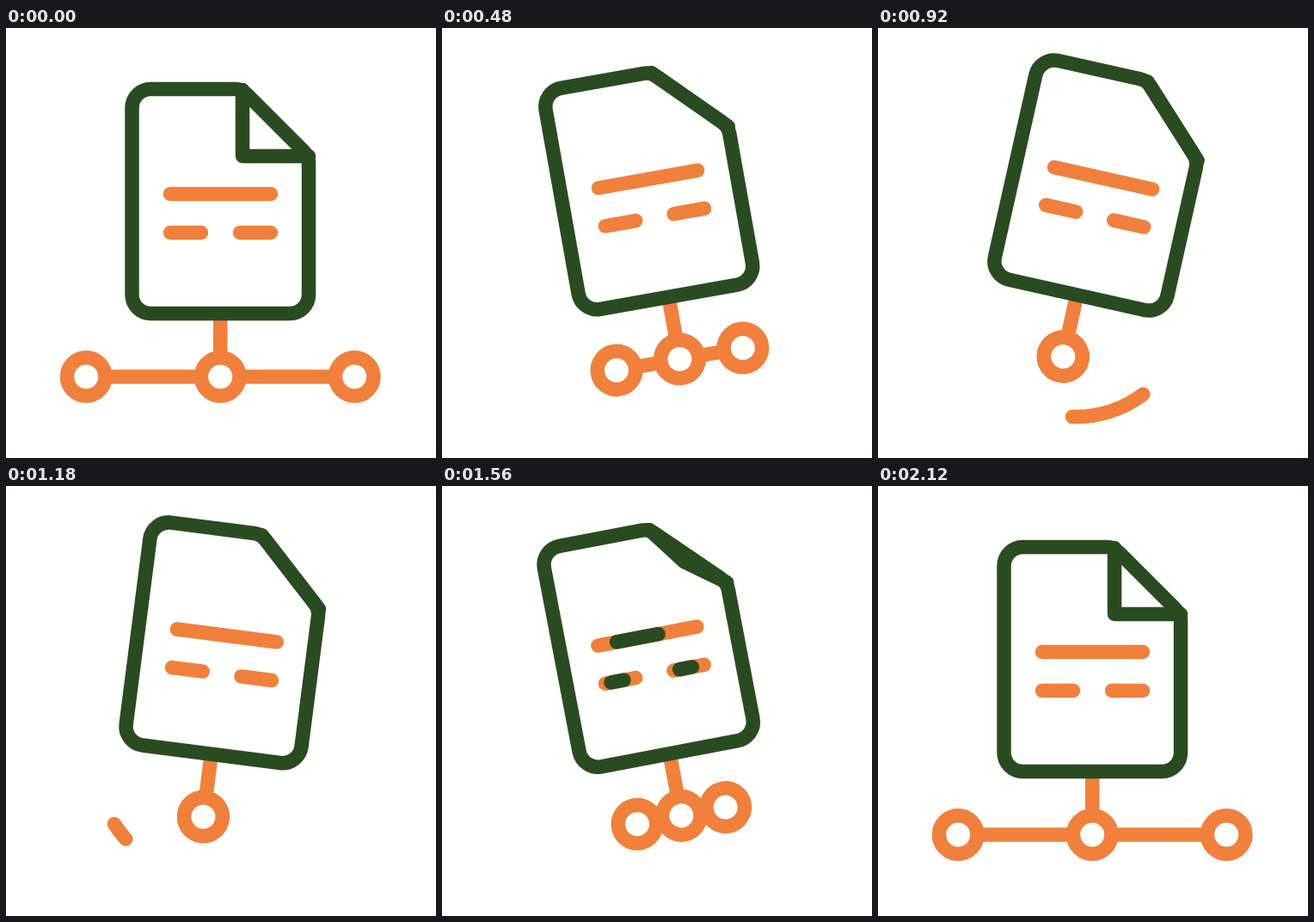
These frames come from a looping animation (500 px wide and 500 px high, 2.32 s). An HTML page with a canvas:

```html
<!DOCTYPE html>
<html lang="en">
<head>
<meta charset="utf-8">
<title>Document network</title>
<style>
  html, body { margin: 0; width: 100%; height: 100%; overflow: hidden; background: #fff; }
  canvas { display: block; width: 500px; height: 500px; }
</style>
</head>
<body>
<canvas id="stage" width="500" height="500"></canvas>
<script>
const ctx = document.getElementById('stage').getContext('2d');
const GREEN = '#2a4b21', ORANGE = '#f0803c';
const LOOP = 2320, STEP = 20;

const clamp = u => Math.max(0, Math.min(1, u));
const smooth = (t, a, b) => (1 - Math.cos(Math.PI * clamp((t - a) / (b - a)))) / 2;
const easeOut = (t, a, b) => 1 - (1 - clamp((t - a) / (b - a))) ** 3;

// Eased value through [time, value] keys.
function track(t, keys) {
  let value = keys[0][1];
  for (let i = 1; i < keys.length; i++) {
    value += (keys[i][1] - keys[i - 1][1]) * smooth(t, keys[i - 1][0], keys[i][0]);
  }
  return value;
}

const tilt = [[80, 0], [310, -14.3], [970, 13], [1012, 13], [1530, -10.9], [2050, 0]];
const lift = [[80, 0], [560, -19.5], [1662, -19.5], [1920, 14], [2120, 0]];
const textLines = [[191, 308, 193], [191, 227, 238], [272, 308, 238]];
const sheet = new Path2D(
  'M168.5 71 H266 Q274 71 280 77 L345 142 Q352 149 352 157 V310 ' +
  'A22 22 0 0 1 330 332 H168.5 A22 22 0 0 1 146.5 310 V93 A22 22 0 0 1 168.5 71 Z');

function line(color, ...points) {
  ctx.strokeStyle = color;
  ctx.beginPath();
  points.forEach(([x, y]) => ctx.lineTo(x, y));
  ctx.stroke();
}

function ring(x) {
  ctx.strokeStyle = ORANGE;
  ctx.beginPath();
  ctx.arc(x, 405.5, 22.25, 0, 2 * Math.PI);
  ctx.fill();
  ctx.stroke();
}

function drawNetwork(t) {
  const gap = 156 * (1 - smooth(t, 222, 724) + easeOut(t, 1492, 2027));
  line(ORANGE, [249.2, 332], [249.2, 405]);
  line(ORANGE, [249.2 - gap, 405.5], [249.2 + gap, 405.5]);
  [-gap, gap, 0].forEach(dx => ring(249.2 + dx));
}

function drawSheet(t) {
  const fold = 38.5 * (smooth(t, 100, 440) - smooth(t, 1500, 1740));
  ctx.strokeStyle = GREEN;
  ctx.fill(sheet);
  ctx.stroke(sheet);
  line(GREEN, [275, 72], [275 + fold, 149 - fold], [352, 149]);
}

function drawText(t) {
  const head = smooth(t, 1400, 1680), tail = smooth(t, 1480, 1760);
  for (const [a, b, y] of textLines) {
    line(ORANGE, [a, y], [b, y]);
    if (head > tail) line(GREEN, [a + (b - a) * tail, y], [a + (b - a) * head, y]);
  }
}

// Stroke sweeping from right to left below the network.
function drawSweep(t) {
  const angle = u => (40 + 99.7 * u) * Math.PI / 180;
  const head = smooth(t, 800, 1080), tail = smooth(t, 900, 1250);
  if (head <= tail) return;
  ctx.strokeStyle = ORANGE;
  ctx.beginPath();
  ctx.arc(249, 341, 133, angle(tail), angle(head));
  ctx.stroke();
}

function draw(t) {
  ctx.setTransform(1, 0, 0, 1, 0, 0);
  ctx.fillStyle = '#fff';
  ctx.fillRect(0, 0, 500, 500);
  ctx.translate(250, 250 + track(t, lift));
  ctx.rotate(track(t, tilt) * Math.PI / 180);
  ctx.translate(-250, -250);
  ctx.lineWidth = 16.5;
  ctx.lineCap = ctx.lineJoin = 'round';
  drawSweep(t);
  drawNetwork(t);
  drawSheet(t);
  drawText(t);
}

const start = performance.now();
function frame() {
  const t = (performance.now() - start) % LOOP;
  draw(Math.floor(t / STEP) * STEP);
  requestAnimationFrame(frame);
}
frame();
</script>
</body>
</html>
```
